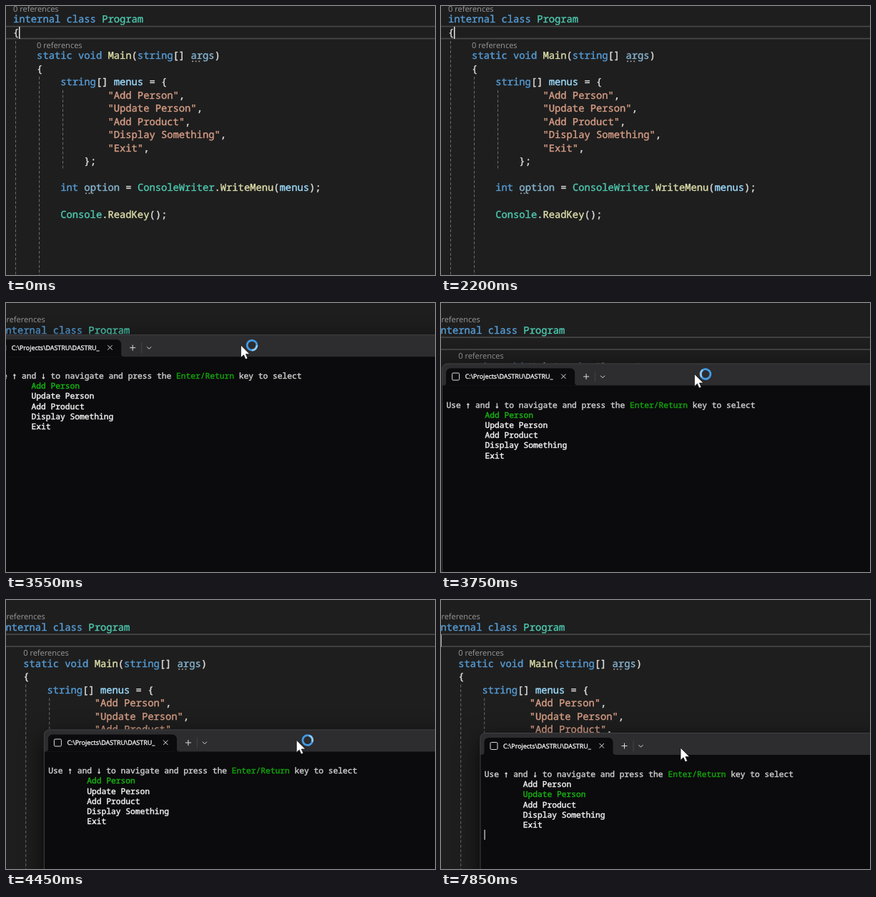
An HTML page that plays this animation: 600x377 px, repeating every 8000 ms.

```html
<!DOCTYPE html>
<html lang="en">
<head>
<meta charset="utf-8">
<title>Console menu</title>
<style>
html, body { margin: 0; width: 100%; height: 100%; overflow: hidden; background: #1e1e1e; }
svg { display: block; width: 600px; height: 377px; }
text { white-space: pre; text-rendering: geometricPrecision; }
/* A thin stroke in the text colour gives a medium weight. */
.code, .term, .tab { fill: currentColor; }
.code text, .code tspan, .term text, .term tspan, .tab { fill: currentColor; stroke: currentColor; }
.code { font: 13.8px "Noto Sans Mono", "DejaVu Sans Mono", monospace; stroke-width: .4; }
.term { font: 11.25px "Noto Sans Mono", "DejaVu Sans Mono", monospace; stroke-width: .45; }
.arrow { font-weight: bold; stroke-width: .8; }
.lens { font: 11.05px "Open Sans", "Noto Sans", sans-serif; fill: #999; }
.tab { font: 8.95px "Open Sans", "Noto Sans", sans-serif; color: #fff; stroke-width: .3; }
.guide { stroke: #6b6b6b; stroke-dasharray: 4 2.6; }
.icon { fill: none; stroke: #ddd; stroke-width: 1; }
.frame { filter: drop-shadow(0 10px 16px rgba(0, 0, 0, .75)); }
</style>
</head>
<body>
<svg viewBox="0 0 600 377">
  <rect width="600" height="377" fill="#1e1e1e"/>
  <g id="editor">
    <path d="M-20 28.7H640M-20 45.7H640" stroke="#464646" stroke-width="1.7"/>
    <path class="guide" d="M13.5 49V400M46.5 99V400M79.5 118V228"/>
    <text class="lens" x="10" y="7.5">0 references</text>
    <text class="lens" x="43" y="58.5">0 references</text>
    <g id="code" class="code"></g>
    <path d="M260 77.5h12M111 262.5h12" stroke="#a8a8a8" stroke-width="1.6" stroke-dasharray="2 2.6"/>
    <rect id="caret" x="18" y="29" width="1.5" height="17" fill="#e6e6e6"/>
  </g>
  <g id="win">
    <rect class="frame" width="830" height="480" rx="7" fill="#0b0a0c"/>
    <path d="M0 31V7a7 7 0 0 1 7-7H823a7 7 0 0 1 7 7V31z" fill="#2d2c2f"/>
    <path d="M2 31q4 0 4-4V13a6 6 0 0 1 6-6H180a6 6 0 0 1 6 6V27q0 4 4 4z" fill="#0b0a0c"/>
    <rect x=".5" y=".5" width="829" height="479" rx="7" fill="none" stroke="#414043"/>
    <rect class="icon" x="14.5" y="13.5" width="10" height="10" rx="1.5"/>
    <text class="tab" x="32.5" y="21.7">C:\Projects\DASTRU\DASTRU_</text>
    <path class="icon" d="M167 15l6.5 6.5m0-6.5l-6.5 6.5M198 18.5h8m-4-4v8M222 17.2l3 3l3-3"/>
    <path d="M214.5 11v15" stroke="#444347"/>
    <g id="menu" class="term"></g>
    <rect id="termCaret" x="6" y="136" width="1.2" height="14" fill="#ddd"/>
  </g>
  <g id="mouse">
    <path d="M0 0V17.5L4 13.8L6.6 19.8L9.6 18.5L7 12.7H12.6z" fill="#fff" stroke="#111" stroke-width=".8"/>
    <g id="spinner" fill="none" stroke-width="2.8">
      <circle r="6.9" stroke="#429be4"/>
      <path d="M6.9 0A6.9 6.9 0 0 1 0 6.9" stroke="#8cc8f3"/>
    </g>
  </g>
</svg>
<script>
const $ = id => document.getElementById(id);
const colors = { k: '#569cd6', t: '#4ec9b0', m: '#dcdcaa', s: '#d69d85', v: '#9cdcfe', u: '#86b4cf', p: '#dcdcdc' };

// Each row: column, baseline, then pairs of colour key and text.
function codeRow(col, y, ...parts) {
  let spans = '';
  for (let i = 0; i < parts.length; i += 2)
    spans += `<tspan color="${colors[parts[i]]}">${parts[i + 1]}</tspan>`;
  return `<text x="${10 + col * 8.28}" y="${y}">${spans}</text>`;
}
const rowY = n => 111.2 + n * 18.53;
const items = ['Add Person', 'Update Person', 'Add Product', 'Display Something', 'Exit'];

$('code').innerHTML = [
  codeRow(0, 23.2, 'k', 'internal class ', 't', 'Program'),
  codeRow(0, 41.8, 'p', '{'),
  codeRow(4, rowY(-2), 'k', 'static void ', 'm', 'Main', 'p', '(', 'k', 'string', 'p', '[] ', 'u', 'args', 'p', ')'),
  codeRow(4, rowY(-1), 'p', '{'),
  codeRow(8, rowY(0), 'k', 'string', 'p', '[] ', 'v', 'menus', 'p', ' = {'),
  ...items.map((name, i) => codeRow(16, rowY(i + 1), 's', `"${name}"`, 'p', ',')),
  codeRow(12, rowY(6), 'p', '};'),
  codeRow(8, rowY(8), 'k', 'int ', 'u', 'option', 'p', ' = ', 't', 'ConsoleWriter', 'p', '.', 'm', 'WriteMenu', 'p', '(', 'v', 'menus', 'p', ');'),
  codeRow(8, rowY(10), 't', 'Console', 'p', '.', 'm', 'ReadKey', 'p', '();')
].join('');

const arrow = c => `<tspan class="arrow">${c}</tspan>`;
$('menu').innerHTML =
  `<text x="6.3" y="62" color="#ccc">Use ${arrow('↑')} and ${arrow('↓')} to navigate and press the ` +
  '<tspan color="#13a10e">Enter/Return</tspan> key to select</text>' +
  items.map((name, i) => `<text class="item" x="60.3" y="${76 + i * 14.25}">${name}</text>`).join('');
const options = document.querySelectorAll('.item');

const ramp = (t, a, b) => Math.min(1, Math.max(0, (t - a) / (b - a)));
const easeOut = u => 1 - (1 - u) ** 2;
const mix = (a, b, u) => a + (b - a) * u;
const show = (id, on) => $(id).setAttribute('visibility', on ? 'visible' : 'hidden');
const move = (id, x, y, more = '') => $(id).setAttribute('transform', `translate(${x} ${y})${more}`);

// Drag path of the window: time, x, y
const drag = [[3200, -110, -189], [3550, -25, 44], [4050, 40, 145], [4650, 54.5, 186]];
function windowAt(t) {
  let [, x, y] = drag[0];
  for (let i = 1; i < drag.length; i++) {
    let u = ramp(t, drag[i - 1][0], drag[i][0]);
    if (i === drag.length - 1) u = easeOut(u);
    x = mix(x, drag[i][1], u);
    y = mix(y, drag[i][2], u);
  }
  return [x, y];
}

function draw(t) {
  const [x, y] = windowAt(t);
  const open = easeOut(ramp(t, 2300, 2600));
  const scale = mix(0.88, 1, open);
  if (t < 2750) move('editor', 0, 0);
  else move('editor', -18.8, 19.5);
  show('caret', t < 2350 ? t < 1150 || t >= 1850 : (t + 200) % 1000 < 540);

  move('win', x, y, ` translate(415 240) scale(${scale}) translate(-415 -240)`);
  $('win').setAttribute('opacity', open);
  show('win', t >= 2350);
  show('termCaret', t >= 5200);
  const selected = t < 7800 ? 0 : 1;
  options.forEach((el, i) => el.setAttribute('color', i === selected ? '#16b213' : '#f2f2f2'));

  const release = easeOut(ramp(t, 4600, 4900));
  move('mouse', x + mix(353.3, 280.5, release), y + mix(14.8, 21, release));
  show('mouse', t >= 3200);
  move('spinner', 15.6, 0.2, ` rotate(${(t - 3550) * 360 / 500})`);
  $('spinner').setAttribute('opacity', t < 7200 ? 1 : 0);
}

const start = performance.now();
function tick() {
  draw((performance.now() - start) % 8000);
  requestAnimationFrame(tick);
}
draw(0);
requestAnimationFrame(tick);
</script>
</body>
</html>
```
